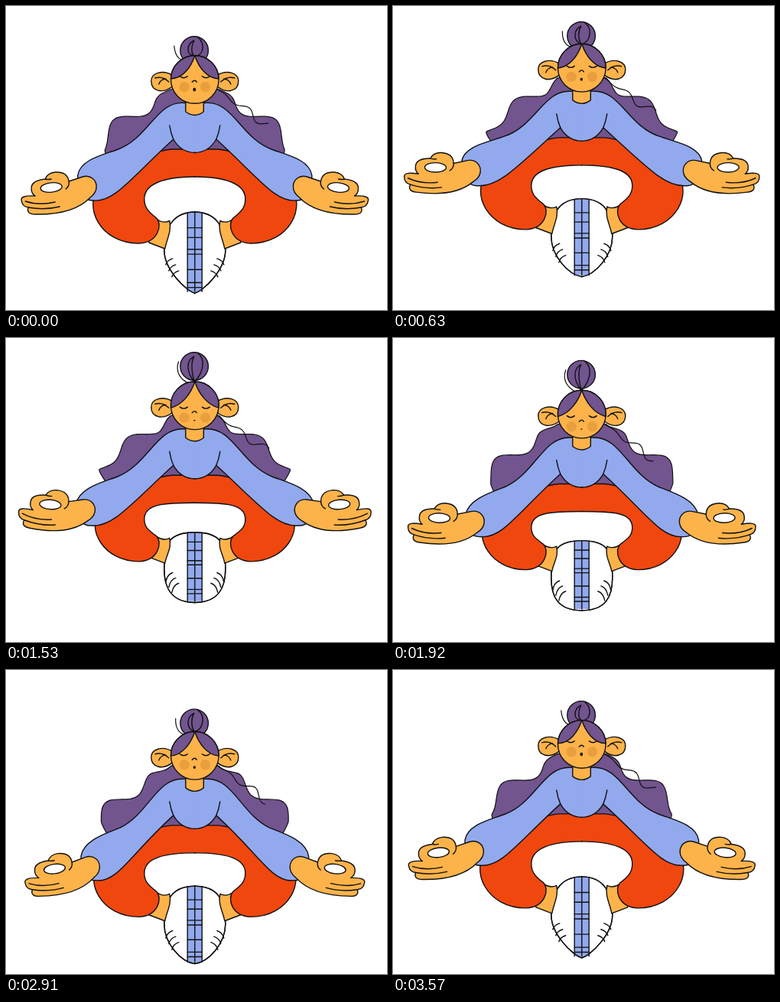
Write an HTML page with a canvas that moves like this. It is 498x397 px and loops after 3600 ms.

```html
<!DOCTYPE html>
<html lang="en">
<head>
<meta charset="utf-8">
<title>Floating meditation</title>
<style>
html, body { margin: 0; width: 100%; height: 100%; overflow: hidden; background: #fff; }
canvas { display: block; }
</style>
</head>
<body>
<canvas id="stage" width="498" height="397"></canvas>
<script>
const ctx = document.getElementById('stage').getContext('2d');
const SKIN = '#fdb34a', CHEEK = '#e99f3d', HAIR = '#72548f', SHIRT = '#92a9ee',
      TROUSERS = '#f0470f', LINE = '#111', WHITE = '#fff';
const LOOP = 3600, WAVE = 900, STEP = 30, TAU = Math.PI * 2;

function ellipse(x, y, rx, ry = rx, tilt = 0) {
  const path = new Path2D();
  path.ellipse(x, y, rx, ry, tilt, 0, TAU);
  return path;
}

// Smooth line that passes the midpoints of the given points.
function smooth(pts) {
  const path = new Path2D();
  path.moveTo(...pts[0]);
  for (let i = 1; i < pts.length - 1; i++) {
    const [x, y] = pts[i], [u, v] = pts[i + 1];
    path.quadraticCurveTo(x, y, (x + u) / 2, (y + v) / 2);
  }
  path.lineTo(...pts.at(-1));
  return path;
}

function fill(path, color) {
  ctx.fillStyle = color;
  ctx.fill(path);
}

function stroke(path, width = 1.4) {
  ctx.lineWidth = width;
  ctx.stroke(path);
}

function shape(path, color) {
  fill(path, color);
  stroke(path);
}

const line = (d, width) => stroke(new Path2D(d), width);

function bothSides(draw) {
  for (const side of [1, -1]) {
    ctx.save();
    ctx.scale(side, 1);
    draw();
    ctx.restore();
  }
}

// Left half of a symmetric shape; both fills come before the outlines.
function symmetric(d, color) {
  const half = new Path2D(d);
  bothSides(() => fill(half, color));
  bothSides(() => stroke(half));
}

// Wave that travels along a sloping line starting beside the head.
function ripple(slope, length, step, offset) {
  const dx = Math.cos(slope), dy = Math.sin(slope), pts = [];
  for (let s = 0; s <= length; s += step) {
    const n = offset(s);
    pts.push([30 + dx * s + dy * n, 12 + dy * s - dx * n]);
  }
  return pts;
}

function drawHair(t) {
  const lock = ripple(.732, 122, 4, s =>
    13 * Math.sin(Math.PI * (s / 132) ** 2) +
    8.5 * Math.min(1, s / 30) * Math.cos(TAU * ((s - 82) / 72 - t / WAVE)));
  lock.push([113, 105]);
  const outline = smooth([...lock.reverse(), ...lock.map(([x, y]) => [-x, y]).reverse()]);
  fill(outline, HAIR);
  stroke(outline, 1.2);
  stroke(smooth(ripple(.62, 80, 4, s =>
    -1 + 6 * Math.min(1, s / 60) * Math.cos(TAU * ((s - 47) / 40 - t / WAVE)))), 1.2);
}

function drawBun(c) {
  const y = -45 + 7 * c;
  line(`M${-24 - 3 * c} ${y - 6}C-26 ${y + 8}-18 ${y + 18}-7-29`, 1.2);
  shape(ellipse(-.7, y, 18.3), HAIR);
  line(`M-.7-31C-12 ${y + 6}-11 ${y - 8}-1 ${y - 13}
        M-.7-31C-5 ${y + 4}-5 ${y - 6}-1 ${y - 13}
        M-.7-31C12 ${y + 8} 14 ${y - 10} 4 ${y - 17}`);
}

function drawShoe(c) {
  const top = 169 + 4 * c, bottom = 267.5 + 11.5 * c, middle = 218 + 5 * c;
  const flat = 29 - 5 * c, toe = 22 - 10 * c, tip = bottom - 1.5 - 1.5 * c;
  const at = f => top + (bottom - top) * f;
  const half = `M.5 ${top}C${-flat} ${top}-40 ${middle - 35}-40 ${middle}
    C-40 ${middle + 25} ${-toe} ${tip} .5 ${bottom}`;
  symmetric(half, WHITE);
  ctx.fillStyle = SHIRT;
  ctx.fillRect(-9.6, at(.01), 19, at(.98) - at(.01));
  line([-9.6, 0, 9.4].map(x => `M${x} ${at(.01)}V${at(.98)}`).join(''));
  line([.165, .285, .43, .49, .68, .84, .9]
    .map(f => `M-9.6 ${at(f + .03 * c)}H9.4`).join(''));
  bothSides(() => {
    line(half);
    for (let i = 0; i < 3; i++) {
      const x = -38 + 4 * i, low = at(.68 - .03 * c + .075 * i), high = at(.575 + .075 * i);
      line(`M${x} ${low}Q${x + 2} ${high + 2} ${x + 9} ${high}`);
    }
  });
}

function drawLegs(c) {
  const lag = 1 - c, lift = 5.5 * lag, inset = 2.5 * lag;
  const ankle = 184.5 - lift * 1.1, heel = 221 - 8 * lag;
  const hem = 214 - lift, knee = 156 - lift * .75;
  bothSides(() => shape(new Path2D(`M-60 ${ankle - 8}L-50 ${ankle - 2}Q-41 ${ankle + 4}-33 ${ankle}
    C-30 ${ankle + 14}-37 ${heel - 12}-39 ${heel}L-60 ${heel - 8}Z`), SKIN));
  symmetric(`M.6 91H-30C-50 92-90 110-125 140
    C${-146 + inset} ${165 - lift / 2} ${-125 + inset} ${hem}-73 ${hem}
    C-48 ${hem - 1}-42 ${hem - 24}-50 ${hem - 33}
    C-62 ${hem - 42}-66 ${knee + 10}-66 ${knee}C-66 ${knee - 20}-40 127 .6 127`, TROUSERS);
}

function drawShirt(dx, dy, drop) {
  const elbowX = -100 + dx / 2, elbowY = 91 + (dy + drop) / 2;
  const cuffX = -153 + dx, cuffY = 125 + dy + drop, underY = 158 + dy;
  symmetric(`M.6 30.5H-14C-50 28-60 76 ${elbowX} ${elbowY}
    C${elbowX - 18} ${elbowY + 7} ${cuffX + 3} ${cuffY - 21} ${cuffX} ${cuffY}
    C${cuffX - 1} ${cuffY + 20} ${cuffX + 8} ${underY + 1} ${cuffX + 21} ${underY}
    C${cuffX + 48} ${underY + 2}-85 130-28 78Q-18 95.5 .6 95.5`, SHIRT);
  bothSides(() => line('M-33 60Q-31.5 70-28 78'));
}

// Drawn with the wrist at the origin.
function drawHand() {
  shape(new Path2D(`M0 0C0-9-8-16-18-13Q-30-9-36-7
    Q-38-20-54-19Q-64-18-67-10Q-86-8-85 3Q-85 9-80 12
    Q-100 11-98 18Q-97 26-89 27Q-92 36-80 36Q-30 37-8 14Q0 8 0 0Z`), SKIN);
  shape(ellipse(-59, 1, 14, 6.2, -.1), WHITE);
  line('M-36-7Q-35-1-40 3M-93 19Q-75 25-54 20M-89 27Q-68 31-48 26M-67-10Q-64-9-59-10');
}

function drawHead(c) {
  bothSides(() => {
    shape(new Path2D('M-28-5C-43-14-57-8-57 2C-57 15-42 20-28 8Z'), SKIN);
    line('M-52-2Q-42-5-34 3M-38-1Q-45 0-47 6');
  });
  shape(ellipse(0, 0, 31.3), SKIN);
  const hairline = 1 - 2 * c;
  bothSides(() => shape(new Path2D(`M0-31.3C-5-16-16-1-31.3 ${hairline}
    A31.3 31.3 0 0 1 0-31.3Z`), HAIR));

  ctx.save();
  ctx.translate(0, -3.2 * c);
  bothSides(() => {
    fill(ellipse(-13.7, 13, 6.7), CHEEK);
    line('M-19.5-1Q-14.5 3-9.5-1');
  });
  line('M-3.5 6.5Q0 2.5 2.5 6.5');
  fill(ellipse(-.5, 16.4, 1.5 + .4 * c, 1.6 + .8 * c), LINE);
  ctx.restore();
}

function draw(t) {
  const angle = TAU * t / LOOP, s = Math.sin(angle), c = Math.cos(angle), lag = 1 - c;
  const reachX = -4.5 * s, reachY = -5 * s + .5 * lag;
  ctx.setTransform(1, 0, 0, 1, 0, 0);
  ctx.fillStyle = WHITE;
  ctx.fillRect(0, 0, 498, 397);
  ctx.translate(246.8, 96 - 17 * s);
  ctx.strokeStyle = LINE;
  ctx.lineCap = ctx.lineJoin = 'round';

  drawHair(t);
  drawShoe(c);
  drawLegs(c);
  drawShirt(reachX, reachY, 2.5 * lag);
  bothSides(() => {
    ctx.translate(-128.6 + reachX, 140 + reachY);
    ctx.rotate((7.5 * s + 6.5 * lag) / 88);
    drawHand();
  });
  shape(new Path2D('M-12 20V42Q0 51 11.5 42V20Z'), SKIN);
  drawBun(c);
  drawHead(c);
}

let start;
function frame(now) {
  start ??= now;
  draw(Math.floor((now - start) / STEP) * STEP % LOOP);
  requestAnimationFrame(frame);
}
draw(0);
requestAnimationFrame(frame);
</script>
</body>
</html>
```
